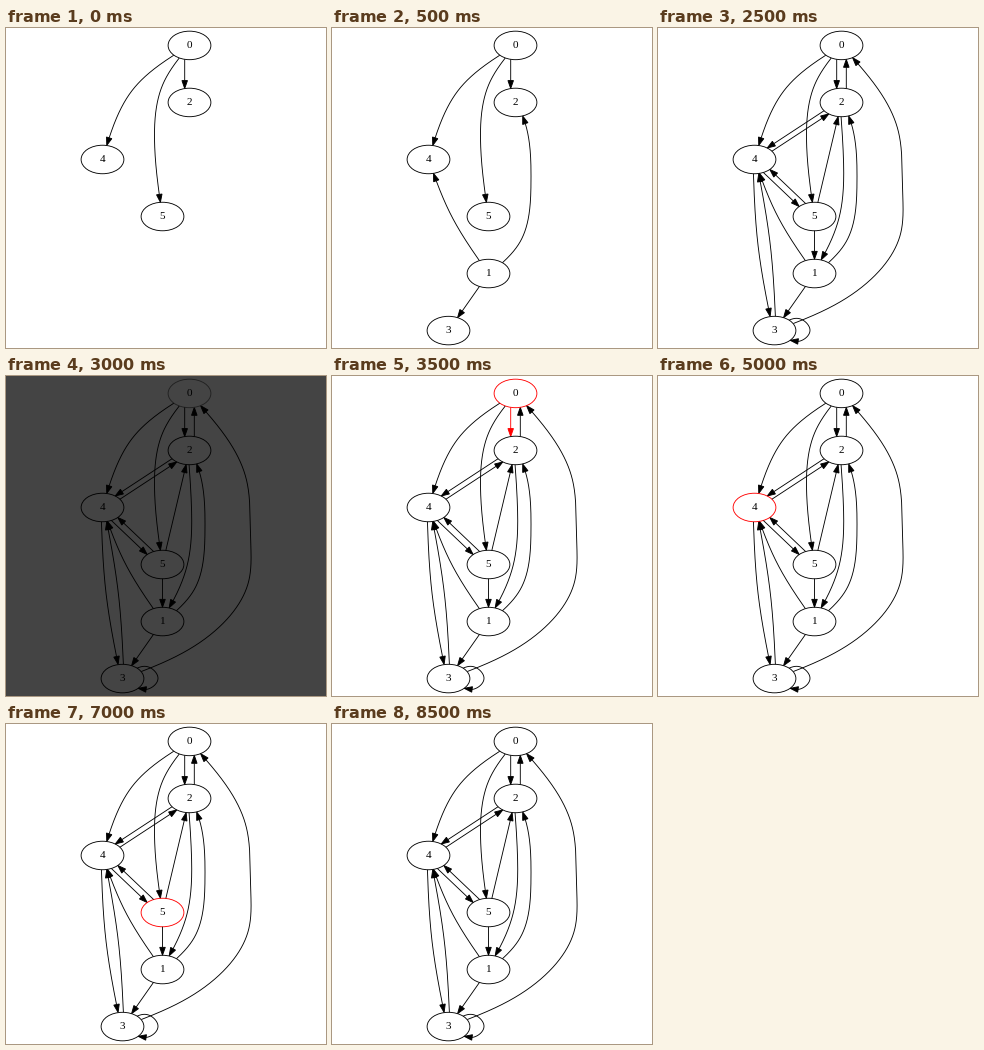
Recreate the animation shown at these times as a matplotlib script. Size 320 by 320 pixels, loop 9000 ms.

```python
import numpy as np
import matplotlib.pyplot as plt
from matplotlib.animation import FuncAnimation
from matplotlib.patches import Ellipse, Polygon

SIZE, DPI = 320, 80
PX = 72 / DPI            # points per pixel
UNIT = 320 / 404         # pixels per layout unit
LINE = 0.88 * PX
RX, RY = 27 * UNIT, 18 * UNIT
HEAD_LEN, HEAD_HALF = 10 * UNIT, 3.5 * UNIT
LANE, ROUTED_LANE = 4.8, 1.5   # sideways shift of two-way edges
WHITE, BLACK, RED = "#ffffff", "#000000", "#ff0000"
DIM_BG, DIM_MARK = "#444444", "#202020"

GRAPH = {0: [2, 4, 5], 1: [2, 3, 4], 2: [0, 4, 1],
         3: [0, 3, 4], 4: [2, 3, 5], 5: [1, 2, 4]}

# One node per rank, from top to bottom
RANKS = {0: 183.5, 2: 183.5, 4: 96.5, 5: 156.5, 1: 156.5, 3: 116.5}
NODES = {n: np.array([x, (22 + 72 * rank) * UNIT])
         for rank, (n, x) in enumerate(RANKS.items())}

# Key points of the edges that go around other nodes
ROUTES = {
    (0, 4): [(126.5, 62)],
    (0, 5): [(157, 56), (148.5, 111)],
    (1, 4): [(118.5, 186)],
    (2, 1): [(185.5, 132), (181, 190), (168, 223)],
    (1, 2): [(188, 214), (199, 152), (192.5, 93)],
    (3, 4): [(112.3, 217)],
    (4, 3): [(100, 217)],
    (3, 0): [(204, 259), (242.5, 206), (244.5, 160), (240.5, 104)],
    (3, 3): [(144, 291.6), (152, 302.5), (141, 313.3), (133, 312.6)],
}


def spline(points, samples=900):
    """Natural cubic spline through the points, spaced by chord length."""
    p = np.array(points, float)
    h = np.hypot(*np.diff(p, axis=0).T)
    knots = np.concatenate([[0], np.cumsum(h)])
    slope = np.diff(p, axis=0) / h[:, None]
    system, rhs = np.eye(len(p)), np.zeros_like(p)
    for i in range(1, len(p) - 1):
        system[i, i - 1:i + 2] = h[i - 1], 2 * (h[i - 1] + h[i]), h[i]
        rhs[i] = 6 * (slope[i] - slope[i - 1])
    curve = np.linalg.solve(system, rhs)

    t = np.linspace(0, knots[-1], samples)
    k = np.clip(np.searchsorted(knots, t) - 1, 0, len(h) - 1)
    w = h[k][:, None]
    b = (t - knots[k])[:, None] / w
    a = 1 - b
    bend = (a**3 - a) * curve[k] + (b**3 - b) * curve[k + 1]
    return a * p[k] + b * p[k + 1] + bend * w**2 / 6


def outside(path, center):
    return (((path - center) / (RX, RY)) ** 2).sum(axis=1) >= 1


def edge_path(a, b):
    """Path from centre to centre, cut at both node outlines."""
    via = ROUTES.get((a, b), [])
    shift = np.zeros(2)
    if a != b and a in GRAPH[b]:
        lane = ROUTED_LANE if via else LANE
        shift[0] = lane * np.sign(NODES[a][1] - NODES[b][1])
    path = spline([NODES[a] + shift, *via, NODES[b] + shift])
    return path[outside(path, NODES[a]) & outside(path, NODES[b])]


fig = plt.figure(figsize=(SIZE / DPI, SIZE / DPI), dpi=DPI)
ax = fig.add_axes([0, 0, 1, 1])
ax.set_xlim(0, SIZE)
ax.set_ylim(SIZE, 0)
ax.axis("off")


def make_edge(a, b):
    path = edge_path(a, b)
    tip = path[-1]
    shaft = path[np.hypot(*(path - tip).T) >= HEAD_LEN]
    base = shaft[-1]
    along = (tip - base) / np.hypot(*(tip - base))
    side = HEAD_HALF * np.array([-along[1], along[0]])
    line, = ax.plot(*shaft.T, lw=LINE, solid_capstyle="butt", snap=False)
    head = Polygon([base + side, tip, base - side], lw=LINE, snap=False,
                   joinstyle="miter")
    ax.add_patch(head)
    return line, head


def make_node(name, center):
    ring = Ellipse(center, 2 * RX, 2 * RY, fc="none", lw=LINE, snap=False)
    ax.add_patch(ring)
    label = ax.text(center[0], center[1] + 2.3, str(name), ha="center",
                    va="baseline", family="Liberation Serif",
                    size=14 * UNIT * PX, color=BLACK)
    return ring, label


def search(node, seen):
    """Depth-first search: the edges that reach new nodes, in order."""
    seen.add(node)
    for other in GRAPH[node]:
        if other not in seen:
            yield node, other
            yield from search(other, seen)


edges = {(a, b): make_edge(a, b) for a in GRAPH for b in GRAPH[a]}
nodes = {n: make_node(n, c) for n, c in NODES.items()}

# Marked node and edge at each step of the search
walk = [(0, None)]
for step in search(0, set()):
    walk += [(step[0], step), (step[1], None)]
walk.append((None, None))


def update(i):
    sources = list(GRAPH)[:i + 1]
    shown = {n for s in sources for n in (s, *GRAPH[s])}
    pos = i - len(GRAPH)
    hot_node, hot_edge = walk[pos] if pos >= 0 else (None, None)
    dim = pos == 0
    mark = DIM_MARK if dim else RED
    fig.patch.set_facecolor(DIM_BG if dim else WHITE)

    for key, parts in edges.items():
        for part in parts:
            part.set_color(mark if key == hot_edge else BLACK)
            part.set_visible(key[0] in sources)
    for name, (ring, label) in nodes.items():
        ring.set_edgecolor(mark if name == hot_node else BLACK)
        ring.set_visible(name in shown)
        label.set_visible(name in shown)
    return []


anim = FuncAnimation(fig, update, frames=len(GRAPH) + len(walk),
                     interval=500, repeat=True, repeat_delay=0, blit=False)
plt.show()
```
